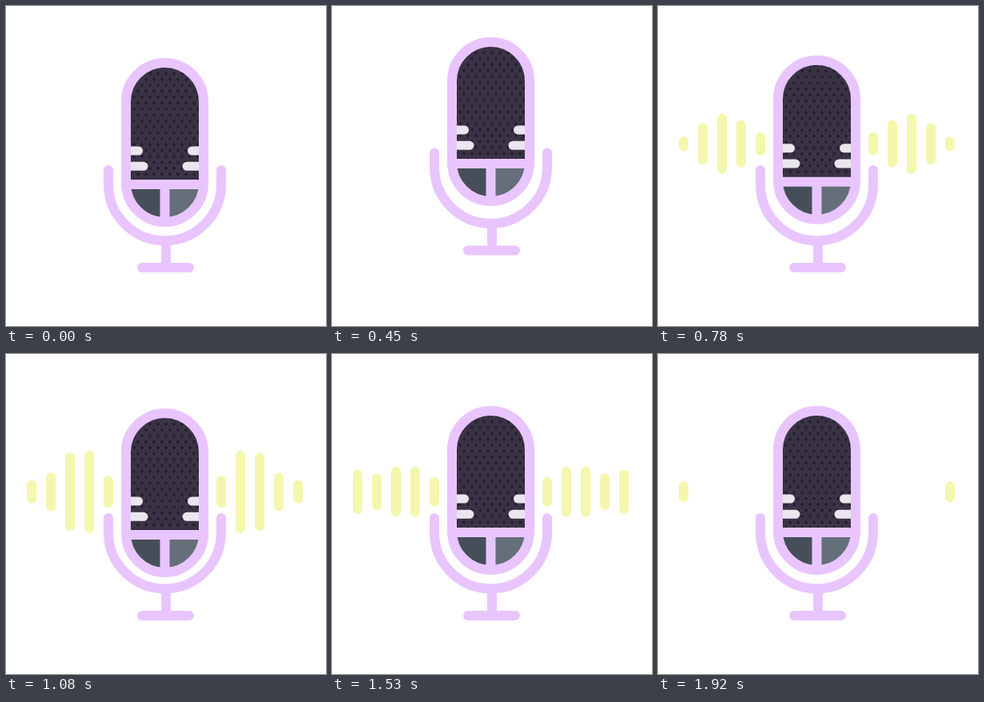
An HTML page for the animation above (1.95 s loop, 400 px wide and 400 px high).

```html
<!DOCTYPE html>
<html lang="en">
<head>
<meta charset="utf-8">
<title>Microphone</title>
<style>
  html, body { margin: 0; width: 100%; height: 100%; overflow: hidden; background: #fff; }
  svg { display: block; width: 100%; height: 100%; }
  .line { fill: none; stroke: #e9c5ff; stroke-width: 12; }
  .round { stroke-linecap: round; }
</style>
</head>
<body>
<svg viewBox="0 0 400 400">
  <defs>
    <clipPath id="shell"><rect x="150" y="71" width="97" height="199" rx="48.5"/></clipPath>
    <pattern id="mesh" x="156" y="80.5" width="10" height="14.8" patternUnits="userSpaceOnUse">
      <g fill="#241f2d">
        <circle cx="4" cy="4" r="2"/>
        <circle cx="9" cy="11.4" r="2"/>
        <circle cx="-1" cy="11.4" r="2"/>
      </g>
    </pattern>
  </defs>
  <g id="waves" fill="none" stroke="#f4f7ad" stroke-width="12" stroke-linecap="round"></g>
  <g id="stand" class="line round">
    <path d="M128 205V223A70.5 70.5 0 0 0 269 223V205M200 294V327M170 327H229"/>
  </g>
  <g id="body">
    <g clip-path="url(#shell)">
      <path fill="#3a3346" d="M150 71H247V223H150Z"/>
      <path fill="url(#mesh)" d="M150 71H247V217H150Z"/>
      <path fill="#464f59" d="M150 223H199V270H150Z"/>
      <path fill="#646f79" d="M199 223H247V270H199Z"/>
      <path class="round" stroke="#e9e6ee" stroke-width="11" d="M150 181H165.5M150 200.3H172M247 181H232.5M247 200.3H226"/>
      <path class="line" d="M150 223H247M198.5 223V270"/>
    </g>
    <rect class="line" x="150" y="71" width="97" height="199" rx="48.5"/>
  </g>
</svg>
<script>
const LOOP = 1950, STEP = 30, MID_Y = 172.3;
const byId = id => document.getElementById(id);

// Keys are [time, value] pairs joined by an ease in and out.
function track(keys, t) {
  if (t <= keys[0][0]) return keys[0][1];
  for (let i = 1; i < keys.length; i++) {
    const [t0, a] = keys[i - 1], [t1, b] = keys[i];
    if (t <= t1) {
      const u = (t - t0) / (t1 - t0);
      return a + (b - a) * u * u * (3 - 2 * u);
    }
  }
  return keys[keys.length - 1][1];
}

const standKeys = [[0, 0], [390, -26], [620, 0]];
const bodyKeys = [[80, 0], [396, -34], [600, 12], [840, -6], [1080, 3], [1260, 0]];

// Line lengths of each bar from the microphone outwards.
const levels = [[17, 28, 25], [47, 91, 51], [63, 86, 51], [40, 36, 34], [6, 17, 43]];

const bars = levels.map(([a, b, c], i) => {
  const path = document.createElementNS("http://www.w3.org/2000/svg", "path");
  byId("waves").append(path);
  const start = 550 + 45 * i, end = 1740 + 60 * i;
  return {
    path, start, end, left: 128 - 24 * i, right: 269 + 24 * i,
    keys: [[start, 0], [780, a], [1080, b], [1530, c], [end + (i === 4 ? 180 : 0), 0]]
  };
});

function draw(t) {
  byId("stand").setAttribute("transform", `translate(0 ${track(standKeys, t)})`);
  byId("body").setAttribute("transform", `translate(0 ${track(bodyKeys, t)})`);
  for (const { path, start, end, left, right, keys } of bars) {
    const half = track(keys, t) / 2;
    const span = x => `M${x} ${MID_Y - half}V${MID_Y + half}`;
    path.setAttribute("d", t > start && t < end ? span(left) + span(right) : "");
  }
}

const begin = performance.now();
function tick() {
  const t = Math.max(0, performance.now() - begin) % LOOP;
  draw(Math.floor(t / STEP) * STEP);
  requestAnimationFrame(tick);
}
tick();
</script>
</body>
</html>
```
